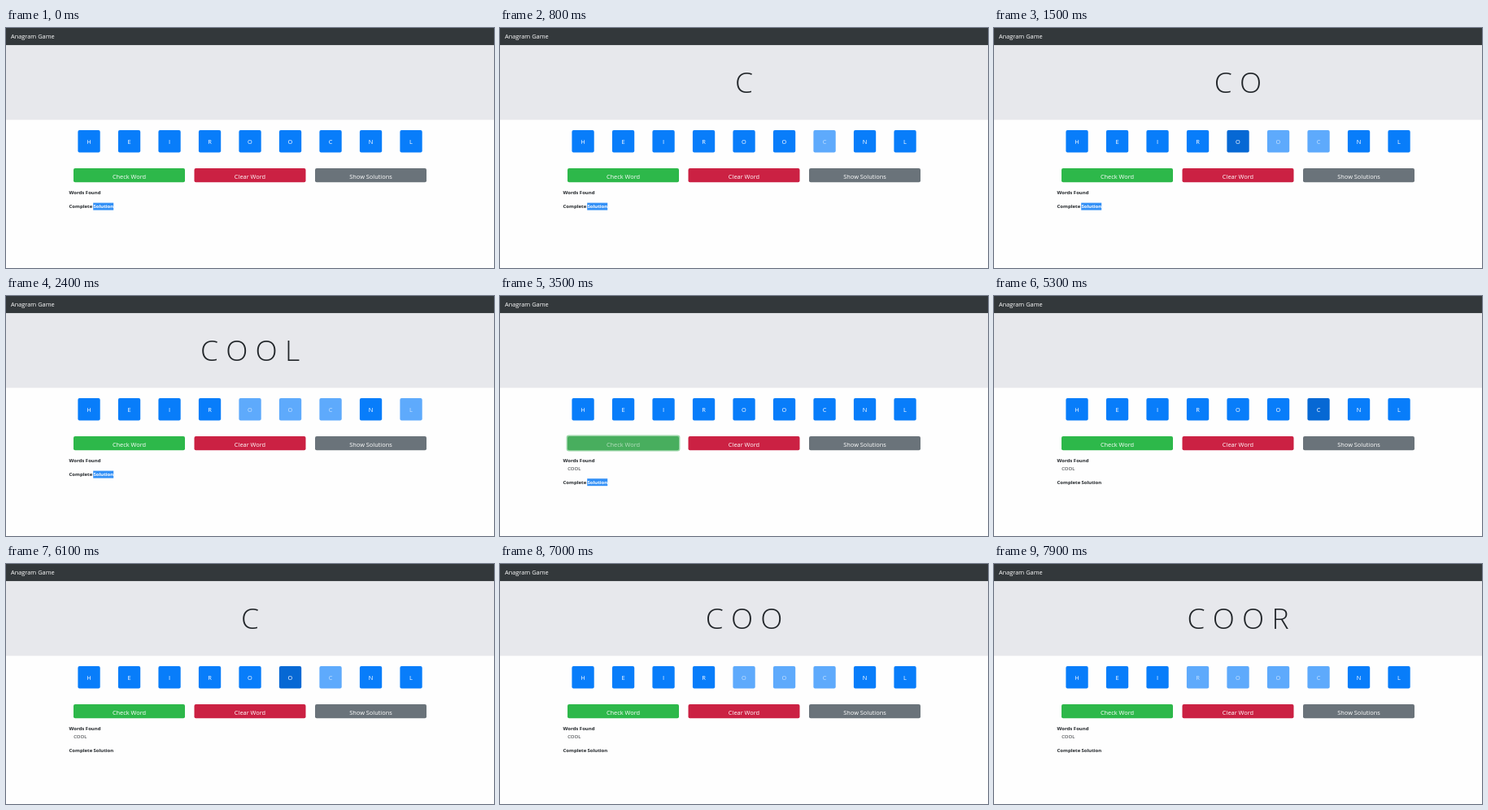
These frames come from a looping animation (600 px wide and 296 px high, 8 s). An HTML page:

```html
<!DOCTYPE html>
<html lang="en">
<head>
<meta charset="utf-8">
<title>Anagram Game</title>
<style>
  html, body { margin: 0; width: 100%; height: 100%; overflow: hidden; background: #fefefe; }
  svg { display: block; width: 600px; height: 296px; }
  text { font: 7.4px "Open Sans", "Noto Sans", sans-serif; fill: #fff; }
  .mid { text-anchor: middle; }
  .word { font-size: 35.5px; font-weight: 300; fill: #212529; }
  .head { font-size: 6px; font-weight: 700; fill: #212529; }
  .found { font-size: 6px; fill: #212529; }
</style>
</head>
<body>
<svg id="stage" viewBox="0 0 600 296"></svg>
<script>
const LOOP = 8000, STEP = 100, FADE = 150;
const BLUE = [8, 125, 250], BLUE_DARK = [6, 104, 212];
const GREEN = [45, 184, 74], GREEN_DARK = [33, 136, 56], GREEN_FOCUS = [72, 174, 94];
const stage = document.getElementById("stage");

function add(tag, attrs, text = "") {
  const el = document.createElementNS("http://www.w3.org/2000/svg", tag);
  for (const key in attrs) el.setAttribute(key, attrs[key]);
  el.textContent = text;
  return stage.appendChild(el);
}
const box = (x, y, width, height, fill, rx = 0) => add("rect", { x, y, width, height, fill, rx });
const label = (x, y, text, cls = "mid") => add("text", { x, y, class: cls }, text);
const clamp = v => Math.min(1, Math.max(0, v));
const mix = (a, b, k) => `rgb(${a.map((v, i) => Math.round(v + (b[i] - v) * k))})`;
const within = (t, a, b) => t >= a && t < b;
const hoverAmount = (t, a, b) => clamp((t - a) / FADE) - clamp((t - b) / FADE);

box(0, 0, 600, 21.3, "#33383b");
label(6, 13.4, "Anagram Game", "");
box(0, 21.3, 600, 92, "#e7e8ec");
const word = label(300, 80, "", "mid word");

const tiles = [..."HEIROOCNL"].map((letter, i) => {
  const x = 88.4 + 49.5 * i;
  return {
    rect: box(x, 126, 27.3, 27.5, "", 2),
    text: label(x + 13.6, 142.9, letter)
  };
});

const ring = box(81.6, 171.6, 139.8, 20, "#9bd6a8", 3);
const check = box(83, 173, 137, 17.2, "", 2);
const checkText = label(151.5, 185.6, "Check Word");
box(231.5, 173, 137, 17.2, "#cb2143", 2);
label(300, 185.6, "Clear Word");
box(380, 173, 137, 17.2, "#6a737a", 2);
label(448.5, 185.6, "Show Solutions");

label(77.5, 205.3, "Words Found", "head");
const found = label(83.2, 214.7, "COOL", "found");
const mark = box(107.2, 0, 25, 9, "#3390f6");
const complete = label(77.5, 0, "Complete ", "head");
const solution = label(107.4, 0, "Solution", "head");

// Tile, pointer enters, pointer leaves
const hovers = [
  [5, 0, 150], [6, 100, 450], [5, 800, 1050], [4, 1300, 1650],
  [7, 2000, 2100], [8, 2050, 2250], [8, 4400, 4650],
  [5, 5000, 5100], [6, 5100, 5650], [5, 5900, 6250], [4, 6450, 6800], [3, 7100, 7500]
];
// Tile, picked, released
const picks = [
  [6, 500, 3200], [5, 1000, 3200], [4, 1600, 3200], [8, 2200, 3200],
  [6, 5700, LOOP], [5, 6300, LOOP], [4, 6800, LOOP], [3, 7500, LOOP]
];
const CHECKED = 3200, BLURRED = 3800;

function draw(now) {
  const t = Math.floor(now % LOOP / STEP) * STEP;
  const picked = picks.filter(([, a, b]) => within(t, a, b)).map(p => p[0]);
  word.textContent = picked.map(i => tiles[i].text.textContent).join(" ");

  tiles.forEach(({ rect, text }, i) => {
    const k = hovers.reduce((sum, [n, a, b]) => sum + (n === i ? hoverAmount(t, a, b) : 0), 0);
    const opacity = picked.includes(i) ? 0.65 : 1;
    rect.setAttribute("fill", mix(BLUE, BLUE_DARK, clamp(k)));
    rect.setAttribute("opacity", opacity);
    text.setAttribute("opacity", opacity);
  });

  const focused = within(t, CHECKED, BLURRED);
  const fill = focused ? mix(GREEN_FOCUS, GREEN, 0)
    : mix(GREEN, GREEN_DARK, hoverAmount(t, 2750, CHECKED - FADE));
  check.setAttribute("fill", fill);
  checkText.setAttribute("opacity", focused ? 0.6 : 1);
  ring.setAttribute("opacity", focused ? 1 : 0);

  const done = t >= CHECKED, selected = t < BLURRED;
  const y = done ? 232 : 222.4;
  found.setAttribute("opacity", done ? 1 : 0);
  complete.setAttribute("y", y);
  solution.setAttribute("y", y);
  solution.style.fill = selected ? "#fff" : "";
  mark.setAttribute("y", y - 6.8);
  mark.setAttribute("opacity", selected ? 1 : 0);
}

const start = performance.now();
function tick() {
  draw(performance.now() - start);
  requestAnimationFrame(tick);
}
tick();
</script>
</body>
</html>
```
